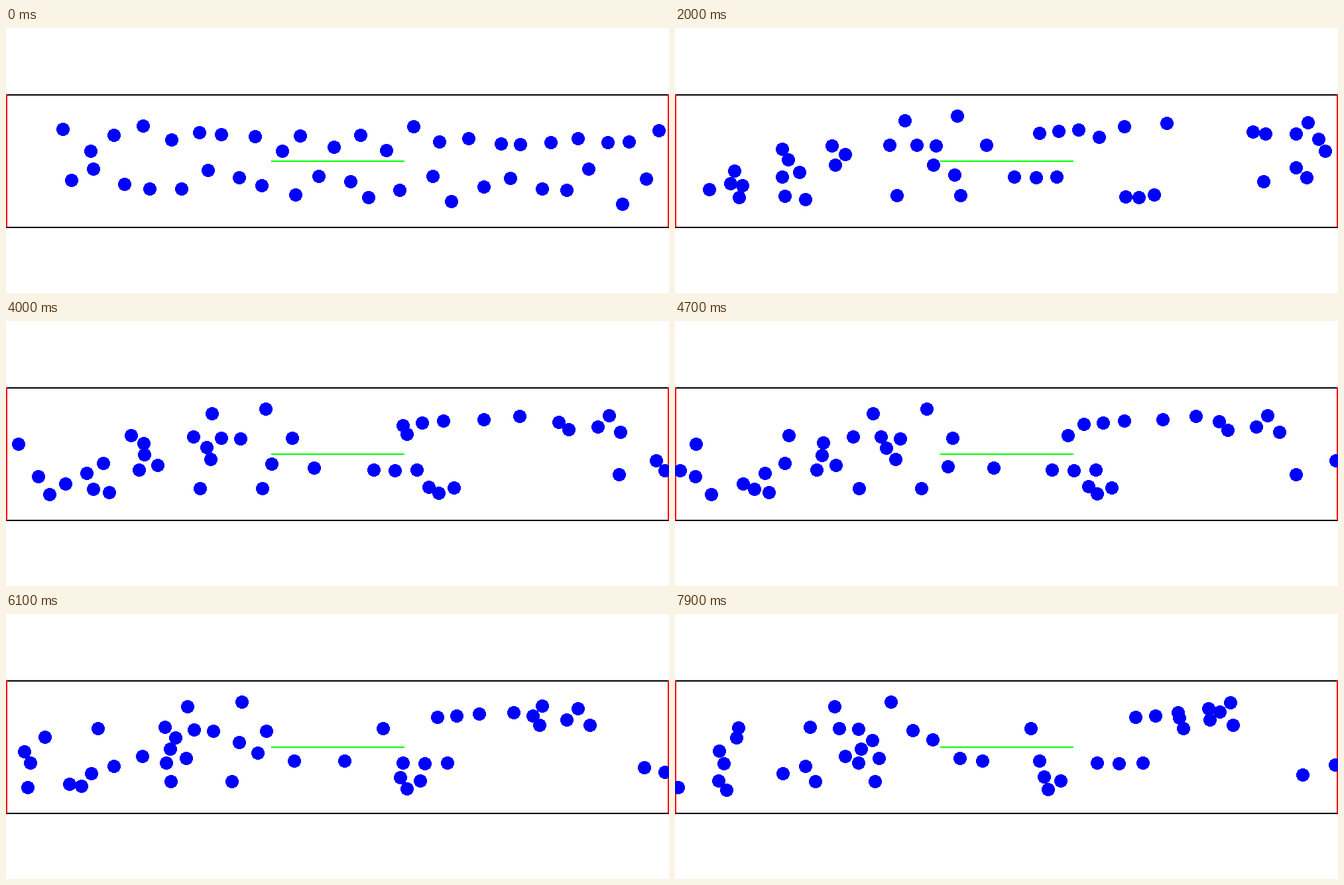
A matplotlib script for the animation above (8 s loop, 1000x400 px).

```python
import numpy as np
import matplotlib.pyplot as plt
from matplotlib.animation import FuncAnimation
from matplotlib.patches import Circle, Rectangle

W, H = 1000, 400
FRAMES, STEP_MS = 80, 100
BODY = 20            # distance at which two walkers touch
RADIUS = 9.33        # unsmoothed fill grows outwards to a 20 px disc
START = 8            # step at which the walkers stand at the places below
WALL_Y, WALL_X0, WALL_X1 = 200, 400, 600

# Walkers heading right and left: x, y, speed per step.
EAST = [
    (30, 244, 1.87), (56, 217, 2.83), (61, 234, 1.92), (134, 186, 2.31),
    (149, 196, 1.86), (138, 226, 1.96), (164, 218, 2.03), (202, 207, 3.35),
    (229, 185, 2.32), (390, 202, 1.6), (396, 221, 2.17), (487, 225, 2.11),
    (519, 226, 2.13), (521, 159, 2.45), (549, 156, 2.48), (549, 225, 2.21),
    (579, 154, 2.54), (652, 151, 2.16), (723, 144, 1.62), (866, 232, 1.83),
    (911, 211, 2.2), (928, 226, 2.05), (958, 186, 1.9),
]
WEST = [
    (133, 239, 2.62), (116, 254, 1.57), (186, 254, 1.69), (221, 259, 2.02),
    (266, 184, 2.4), (348, 177, 2.03), (369, 140, 1.8), (360, 253, 2.09),
    (389, 177, 1.99), (418, 178, 1.99), (447, 133, 1.71), (457, 253, 2.18),
    (492, 177, 1.87), (661, 163, 1.74), (705, 255, 2.08), (728, 256, 2.33),
    (752, 252, 2.39), (894, 157, 1.87), (916, 160, 2.1), (963, 160, 2.2),
    (982, 143, 2.25), (997, 168, 2.19),
]


def sidestep(x, y):
    """Vertical push on each walker from everyone it touches."""
    dx = (x[:, None] - x + W / 2) % W - W / 2
    dy = y[:, None] - y
    overlap = np.maximum(BODY - np.hypot(dx, dy), 0)
    return (0.1 * overlap * np.sign(dy)).sum(axis=1)


def advance(x, y, v):
    """One step: walk on, slide round the wall, dodge the others."""
    off = y - WALL_Y
    at_end = (x % W > WALL_X0 - 12) & (x % W < WALL_X0) & (v > 0)
    blocked = at_end & (abs(off) < 13)
    near = (x % W > WALL_X0 - 30) & (x % W < WALL_X1) & (abs(off) < 22)
    slide = np.where(near, 0.45 * np.sign(off), 0)
    return x + np.where(blocked, 0, v), y + slide + sidestep(x, y)


def opening_crowd(count):
    """Loose crowd in two bands, seen for one step before the cut."""
    rng = np.random.default_rng(4)
    x = np.linspace(78, 987, count) + rng.uniform(-9, 9, count)
    upper = np.arange(count) % 2 == 0
    y = np.where(upper, rng.uniform(146, 188, count), rng.uniform(206, 268, count))
    return np.column_stack([x, y])


def walk_all():
    x, y, v = np.array(EAST + [(x, y, -v) for x, y, v in WEST], float).T
    paths = np.empty((FRAMES, len(x), 2))
    for step in range(START):
        paths[step] = np.column_stack([x - v * (START - step), y])
    for step in range(START, FRAMES):
        paths[step] = np.column_stack([x, y])
        x, y = advance(x, y, v)
    paths[0] = opening_crowd(len(x))
    paths = np.round(paths)
    paths[..., 0] %= W
    return paths


paths = walk_all()

fig = plt.figure(figsize=(W / 100, H / 100), dpi=100, facecolor="white")
ax = fig.add_axes([0, 0, 1, 1])
ax.set_xlim(0, W)
ax.set_ylim(H, 0)
ax.axis("off")


def bar(x, y, w, h, color):
    ax.add_patch(Rectangle((x, y), w, h, fc=color, lw=0, antialiased=False))


for edge in (100, 300):
    bar(0, edge, W, 2, "#000000")
for side in (0, W - 2):
    bar(side, 100, 2, 201, "#ff0000")
bar(WALL_X0, WALL_Y, WALL_X1 - WALL_X0 + 1, 2, "#00ff00")

dots = [
    ax.add_patch(Circle(tuple(p), RADIUS, fc="#0000ff", lw=0, antialiased=False, zorder=3))
    for p in paths[0]
]


def draw(step):
    for dot, place in zip(dots, paths[step]):
        dot.set_center(tuple(place))
    return dots


anim = FuncAnimation(fig, draw, frames=FRAMES, interval=STEP_MS,
                     repeat=True, repeat_delay=0, blit=False)
plt.show()
```
